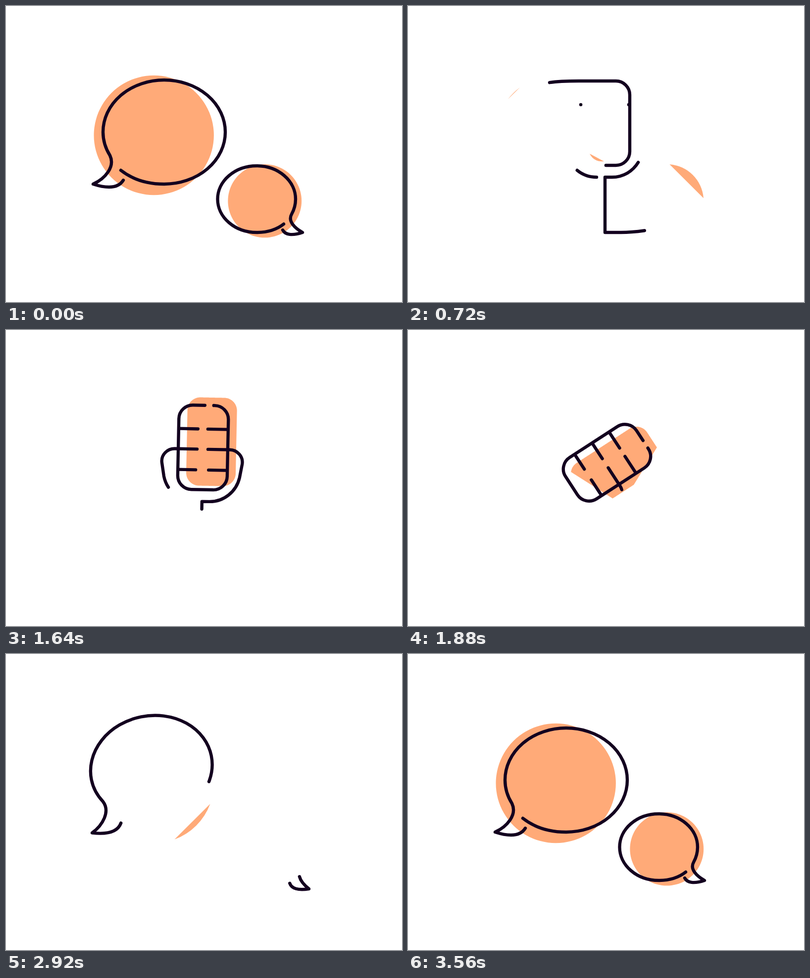
Animation of 800x600 px, one loop 3.64 s. Source, as an HTML page:

```html
<!DOCTYPE html>
<html lang="en">
<head>
<meta charset="utf-8">
<title>Bubbles and microphone</title>
<style>
  html, body { margin: 0; width: 100%; height: 100%; overflow: hidden; background: #fff; }
  svg { display: block; width: 800px; height: 600px; }
  .fill path { fill: #ffaa78; }
  .line path { fill: none; stroke: #13001f; stroke-width: 6.4; stroke-linecap: round; stroke-linejoin: round; }
</style>
</head>
<body>
<svg viewBox="0 0 800 600">
  <defs>
    <path id="plate" d="M396 315H391A26 26 0 0 1 365 289V162A26 26 0 0 1 391 136H439A26 26 0 0 1 465 162V289A26 26 0 0 1 439 315Z"/>
  </defs>
  <g class="fill">
    <path id="discBig"/>
    <path id="discSmall"/>
    <g class="mic"><path id="micFill"/></g>
  </g>
  <g class="line">
    <g id="bigGroup"><path id="big" d="M237 353C228 368 207 371 176 361C200 350 221 326 210 303C200 287 196 272 196 255.5A123.5 105.5 0 0 1 319.5 150A123.5 105.5 0 0 1 443 255.5A123.5 105.5 0 0 1 319.5 361C285 361 255 351 232 333"/></g>
    <g id="smallGroup"><path id="small" d="M559 454C564 464 578 466 599 459C583 450 569 436 577 422C582 413 585 403 585 391.5A78.5 67.5 0 0 0 506.5 324A79 67.5 0 0 0 427.5 391.5A79 67.5 0 0 0 506.5 459C528 459 547 453 561 442"/></g>
    <path id="swoopBig"/>
    <path id="swoopSmall"/>
    <g class="mic">
      <path id="body" d="M270 158.8C285 154.2 305 152 345 152H420A28 28 0 0 1 448 180V295A28 28 0 0 1 420 323H376A28 28 0 0 1 348 295V180A28 28 0 0 1 376 152H400"/>
      <path id="stand" d="M561 442C505 450 470 459 430 459H398V347H412C443 347 467 325 473 297L477.7 270C480 254 467 241 452 241H408"/>
      <path id="cradle" d="M381 347C350 347 326 325 320 297L315.5 270C313 254 326 241 341 241H386"/>
      <path id="barA" d="M349 200H387"/>
      <path id="barB" d="M446 200H407"/>
      <path id="barC" d="M349 283H384"/>
      <path id="barD" d="M446 283H410"/>
    </g>
  </g>
</svg>
<script>
const LOOP = 3640, STEP = 40;
const $ = id => document.getElementById(id);
const clamp = v => Math.min(1, Math.max(0, v));

const ease = {
  lin: u => u,
  in: u => u * u,
  out: u => 1 - (1 - u) * (1 - u),
  both: u => u < .5 ? 2 * u * u : 1 - 2 * (1 - u) * (1 - u),
  sine: u => Math.sin(u * Math.PI / 2)
};

// Keys are [time, value, easing into this key].
function key(t, ...keys) {
  let [t0, v0] = keys[0];
  for (const [t1, v1, e = 'lin'] of keys.slice(1)) {
    if (t < t1) return v0 + (v1 - v0) * ease[e](clamp((t - t0) / (t1 - t0)));
    t0 = t1; v0 = v1;
  }
  return v0;
}

const len = el => el.getTotalLength();

// Length along a path at its point closest to (x, y).
function near(el, x, y) {
  let best = 0, min = Infinity;
  for (let s = 0, n = len(el); s <= n; s += .5) {
    const p = el.getPointAtLength(s), d = Math.hypot(p.x - x, p.y - y);
    if (d < min) { min = d; best = s; }
  }
  return best;
}

function trim(el, from, to) {
  const shown = to - from > .05;
  el.style.display = shown ? '' : 'none';
  if (!shown) return;
  el.style.strokeDasharray = (to - from) + ' 9999';
  el.style.strokeDashoffset = -from;
}

function rotate([x, y], deg) {
  const a = deg * Math.PI / 180, c = Math.cos(a), s = Math.sin(a);
  return [x * c - y * s, x * s + y * c];
}

// Circle segment cut by a chord, centred on direction mid.
function segment(el, cx, cy, r, mid, half) {
  half = Math.min(half, 179.99);
  el.style.display = half > .1 ? '' : 'none';
  const at = deg => rotate([r, 0], deg).map((v, i) => (v + (i ? cy : cx)).toFixed(3)).join(' ');
  el.setAttribute('d', `M${at(mid - half)}A${r} ${r} 0 ${half > 90 ? 1 : 0} 1 ${at(mid + half)}Z`);
}

const plate = $('plate'), plateLen = len(plate);
function platePart(...spans) {
  const pts = [];
  for (const [a, b] of spans) {
    const n = Math.max(1, Math.ceil((b - a) / 2));
    for (let i = 0; i <= n; i++) {
      const s = a + (b - a) * i / n;
      const p = plate.getPointAtLength((s + plateLen) % plateLen);
      pts.push(p.x.toFixed(2) + ' ' + p.y.toFixed(2));
    }
  }
  $('micFill').setAttribute('d', 'M' + pts.join('L') + 'Z');
}

const big = $('big'), small = $('small'), body = $('body'), stand = $('stand'), cradle = $('cradle');
const bigLen = len(big), smallLen = len(small), bodyLen = len(body), standLen = len(stand), cradleLen = len(cradle);
const at = {
  seam: near(big, 270, 158.8), bigMid: near(big, 427, 305), smallMid: near(small, 576, 438),
  entry: near(body, 286, 155), open: near(body, 418, 152), floor: near(body, 400, 323),
  dashA: near(body, 448, 226), dashB: near(body, 448, 249),
  foot: near(stand, 478, 455), base: near(stand, 415, 459), arm: near(stand, 465.5, 317.5), joint: near(stand, 460, 243),
  cup: near(cradle, 342, 333), side: near(cradle, 349, 241)
};

// Tail of the line that leaves the big bubble, measured from the bubble's tail.
const bigTail = t => key(t, [60, 0], [720, at.seam + at.entry, 'in'], [1080, at.seam + at.open, 'out']);

function discs(t) {
  const bigHalf = t < 1500 ? key(t, [200, 180], [732, 0, 'in']) : key(t, [2862, 0], [3520, 180, 'sine']);
  const smallHalf = t < 1500 ? key(t, [280, 180], [780, 0, 'in']) : key(t, [3009, 0], [3560, 180, 'sine']);
  segment($('discBig'), 298.7, 262, 121.2, t < 1500 ? 225 : 45, bigHalf);
  segment($('discSmall'), 522.8, 395.2, 74.4, t < 1500 ? 315 : 135, smallHalf);
}

function micPlate(t) {
  const on = t > 690 && t < 2080;
  $('micFill').style.display = on ? '' : 'none';
  if (!on) return;
  if (t <= 1700) {
    platePart([0, key(t, [690, 0], [720, 35, 'in'], [1120, plateLen - .01, 'sine'])]);
    return;
  }
  platePart(
    [key(t, [1700, -41], [1880, 23.5, 'in'], [2080, 136]), key(t, [1700, 303], [1880, 249.6, 'in'], [2080, 136])],
    [key(t, [1700, 303], [1880, 357, 'in'], [2080, 382, 'out']), key(t, [1700, 472], [1880, 407.8, 'in'], [2080, 382, 'out'])]
  );
}

function micLines(t) {
  const r = key(t, [1600, 0], [1880, 57, 'in'], [2060, 90, 'out']);
  const dx = key(t, [1600, 0], [1880, 4, 'in'], [2300, 11, 'both']);
  const dy = key(t, [1600, 0], [1880, 31.5, 'in'], [2300, 119.5, 'sine']);
  for (const g of document.querySelectorAll('.mic'))
    g.setAttribute('transform', `translate(${dx} ${dy}) rotate(${r} 398 237.5)`);

  if (t > 2360) trim(body, 0, 0);
  else trim(body,
    t < 1900 ? Math.max(0, bigTail(t) - at.seam) : key(t, [1900, at.open], [2280, at.dashA, 'both']),
    key(t, [420, 0], [720, at.floor, 'in'], [1080, bodyLen, 'out'], [1900, bodyLen], [2280, at.dashB, 'both']));

  trim(stand,
    key(t, [500, 0], [720, at.foot, 'in'], [1100, at.base, 'out'], [1240, at.base], [1880, at.joint, 'in'], [2100, standLen, 'both']),
    key(t, [420, 0], [720, at.arm, 'in'], [1080, standLen, 'out']));
  trim(cradle,
    key(t, [1300, 0], [1860, at.side, 'in'], [1900, at.side], [2100, cradleLen, 'both']),
    key(t, [640, 0], [720, at.cup, 'in'], [1080, cradleLen, 'out']));

  const bar = (id, start) => {
    const el = $(id), n = len(el);
    trim(el, 0, key(t, [start, 0], [start + 20, .1], [start + 300, n, 'both'], [1900, n], [2140, 0, 'both']));
  };
  bar('barA', 700); bar('barB', 700); bar('barC', 760); bar('barD', 760);
}

// Line running from the dash to a bubble tail.
function swoop(el, t, x0, x1, end, back, arrive) {
  const on = t > 2360 && t < 2860;
  el.style.display = on ? '' : 'none';
  if (!on) return;
  const [x, y] = end, reach = x1 + (x - x1) * .4;
  el.setAttribute('d', `M${x0} 407H${x1}C${reach} 407 ${x + back[0]} ${y + back[1]} ${x} ${y}`);
  const n = len(el);
  trim(el, key(t, [2440, 0], [2860, n, 'in']), key(t, [2360, 23], [arrive, n, 'both']));
}

function bubbles(t) {
  if (t < 1500) {
    $('bigGroup').removeAttribute('transform');
    $('smallGroup').removeAttribute('transform');
    trim(big, bigTail(t), key(t, [0, bigLen], [560, at.seam, 'both']));
    trim(small, key(t, [0, 0], [580, smallLen, 'both']), smallLen);
    swoop($('swoopBig'), t);
    swoop($('swoopSmall'), t);
    return;
  }
  const sway = Math.pow(1 - clamp((t - 2600) / 800), 3);
  const turn = -53 * sway, k = Math.min(1.45, sway / .216);
  const bigTip = [176 - 2 * k, 361 + 1.6 * k], smallTip = [599 + 13 * k, 459 + 17 * k];
  $('bigGroup').setAttribute('transform', `translate(${bigTip}) rotate(${turn}) translate(-176 -361)`);
  $('smallGroup').setAttribute('transform', `translate(${smallTip}) rotate(${9 * k}) translate(-599 -459)`);
  trim(big, 0, key(t, [2680, 0], [2920, at.bigMid, 'in'], [3220, bigLen, 'out']));
  trim(small, 0, key(t, [2760, 0], [2920, at.smallMid, 'in'], [3360, smallLen, 'both']));

  const from = (tip, offset, deg) => rotate(offset, deg).map((v, i) => v + tip[i]);
  swoop($('swoopBig'), t, 420, 397, from(bigTip, [61, -8], turn), rotate([36, -60], turn), 2680);
  swoop($('swoopSmall'), t, 397, 420, from(smallTip, [-40, -5], 9 * k), rotate([-30, -60], 9 * k), 2760);
}

function draw() {
  const t = Math.floor(performance.now() % LOOP / STEP) * STEP;
  discs(t);
  micPlate(t);
  micLines(t);
  bubbles(t);
  requestAnimationFrame(draw);
}
draw();
</script>
</body>
</html>
```
